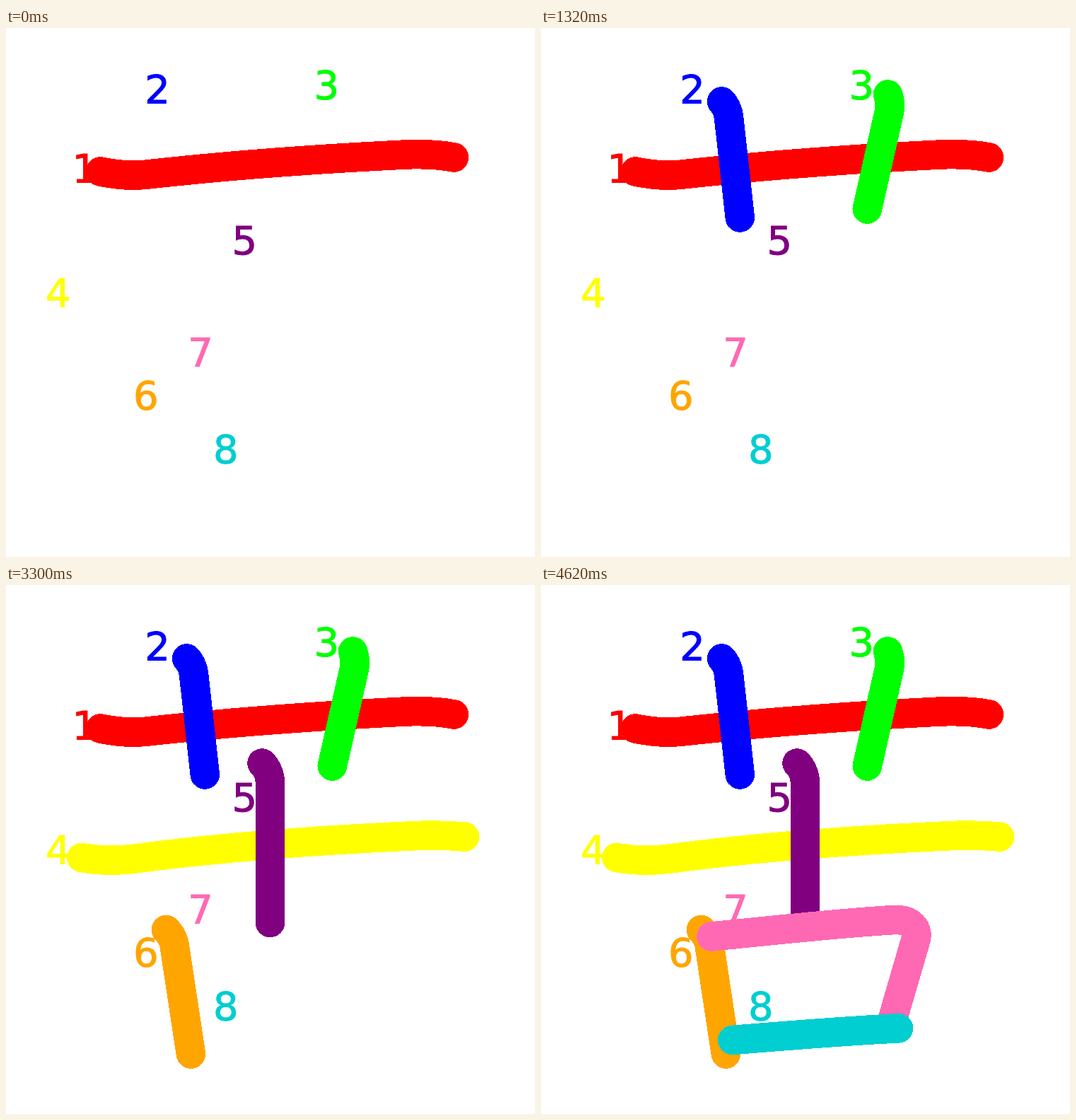
These frames come from a looping animation (748x748 px, 5.28 s). An HTML page:

```html
<!DOCTYPE html>
<html lang="en">
<head>
<meta charset="utf-8">
<title>Stroke order</title>
<style>
  html, body { margin: 0; width: 100%; height: 100%; overflow: hidden; background: #fff; }
  svg { display: block; width: 100vw; height: 100vh; }
  path { fill: none; stroke-width: 41.6; stroke-linecap: round; stroke-linejoin: round; shape-rendering: crispEdges; }
  text { font: 56px "DejaVu Sans", sans-serif; stroke-width: 1; }
</style>
</head>
<body>
<svg id="stage" viewBox="0 0 748 748"></svg>
<script>
const STEP = 660;

// colour, label x, label baseline, stroke path
const strokes = [
  ['#ff0000', 93.6, 217.8, 'M133.5 203C155 207.5 178 209.5 200 207C322 193.5 442 185 565 179C588 178 610 178.5 633.5 183'],
  ['#0000ff', 196.2, 106.3, 'M255.5 104C260 108.5 264.5 117 265.5 126L281.3 268'],
  ['#00ff00', 435.6, 100.3, 'M490.5 94C493 101 494.3 110 492.3 119L461.3 256'],
  ['#ffff00', 56, 394.4, 'M106.8 385.5C130 389.5 155 390.5 182 387C310 370 460 360 575 354.8C600 353.5 625 354 648.6 356'],
  ['#800080', 319.6, 319.8, 'M362 252C368 258 373.5 268 373.5 280V477.4'],
  ['#ffa500', 180, 539.2, 'M226.5 487.6C231 492 236.5 500 238 508.5L261.4 663'],
  ['#ff69b4', 257.3, 477.8, 'M241 497C330 488.5 420 478 500 473.5C522 472.5 535.5 486 529.5 503L494.7 622.4'],
  ['#00ced1', 293.1, 614.5, 'M270.8 643.5C350 637 430 630.5 505.5 626.8']
];

const stage = document.getElementById('stage');

function add(tag, attrs) {
  const el = document.createElementNS('http://www.w3.org/2000/svg', tag);
  for (const key in attrs) el.setAttribute(key, attrs[key]);
  return stage.appendChild(el);
}

strokes.forEach(([color, x, y], i) => {
  add('text', { x, y, fill: color, stroke: color }).textContent = i + 1;
});
const paths = strokes.map(([stroke, , , d]) => add('path', { d, stroke }));

const start = performance.now();

function draw() {
  const step = Math.floor((performance.now() - start) / STEP) % paths.length;
  paths.forEach((path, i) => {
    path.style.visibility = i <= step ? 'visible' : 'hidden';
  });
  requestAnimationFrame(draw);
}
draw();
</script>
</body>
</html>
```
